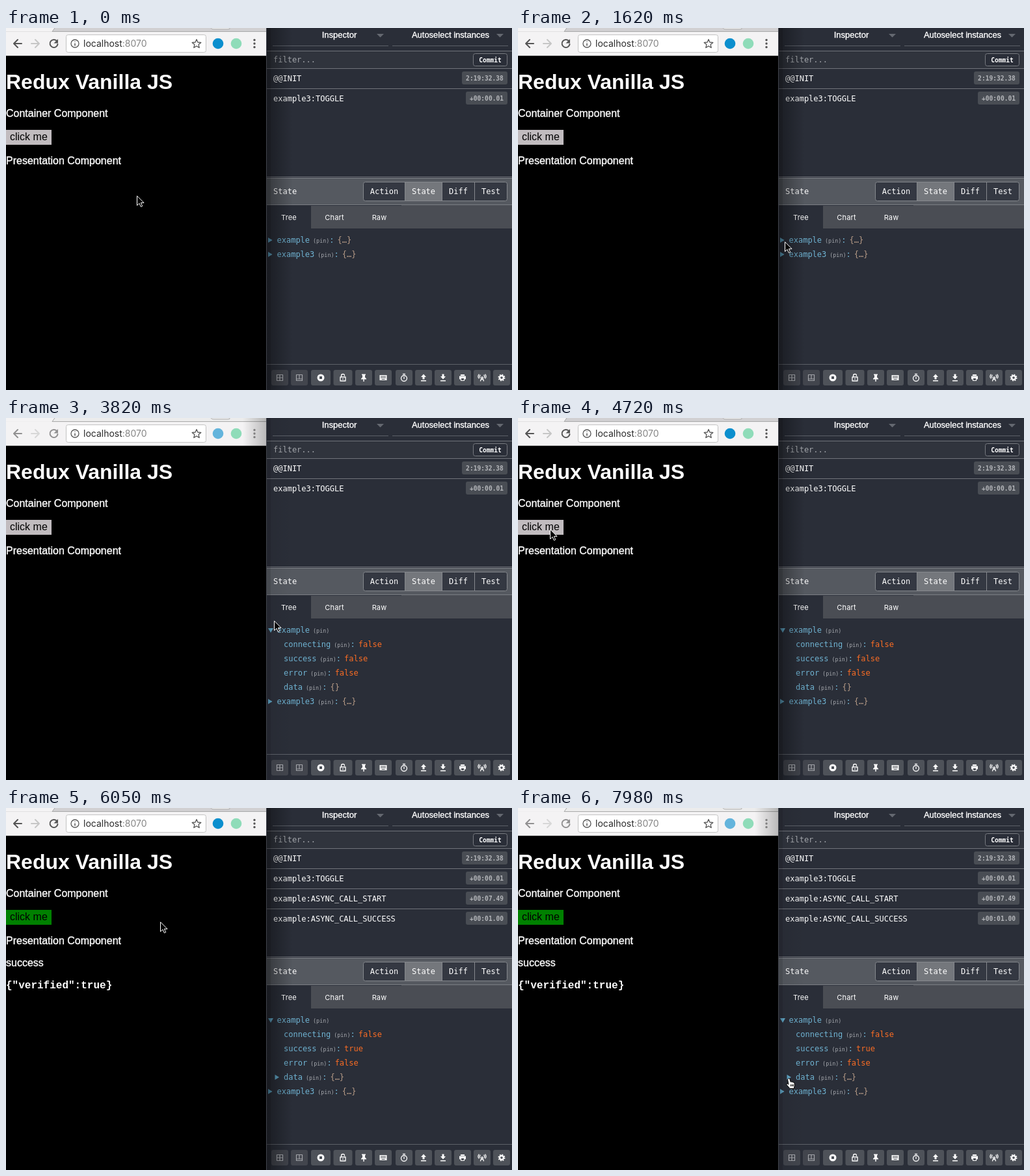
Animation of 778x558 px, one loop 8000 ms. Source, as an HTML page:

```html
<!DOCTYPE html>
<html lang="en">
<head>
<meta charset="utf-8">
<title>Redux Vanilla JS</title>
<style>
  html, body { margin: 0; width: 100%; height: 100%; overflow: hidden; background: #000; }
  svg { display: block; width: 778px; height: 558px; }
  text { white-space: pre; }
  .page { font: 16px "Liberation Sans", Arial, sans-serif; fill: #fff; stroke: #fff; stroke-width: .35px; }
  .title { font-size: 32px; font-weight: bold; stroke: none; }
  .label { fill: #000; stroke: none; }
  .json { font: bold 16px "Liberation Mono", monospace; stroke: none; }
  .url { font: 14px Inter, sans-serif; fill: #2b2b2b; }
  .menu { font: 13px "Liberation Sans", Arial, sans-serif; fill: #fff; stroke: #fff; stroke-width: .35px; text-anchor: middle; }
  .mono { font: 12px "DejaVu Sans Mono", monospace; fill: #fff; }
  .small { font: bold 9.6px "DejaVu Sans Mono", monospace; fill: #b4b6ba; text-anchor: middle; }
  .pin { font: 8.4px "DejaVu Sans Mono", monospace; fill: #a5a8ad; }
  .tab { font: 11px Inter, sans-serif; fill: #fff; text-anchor: middle; letter-spacing: .15px; }
  .mid { text-anchor: middle; }
  .line { fill: none; stroke-linecap: round; stroke-linejoin: round; }
</style>
</head>
<body>
<svg viewBox="0 0 778 558">
  <defs>
    <linearGradient id="shade"><stop offset="0" stop-opacity=".36"/><stop offset="1" stop-opacity="0"/></linearGradient>
    <linearGradient id="edge"><stop offset="0" stop-opacity="0"/><stop offset="1" stop-opacity=".24"/></linearGradient>
  </defs>

  <g id="browser">
    <rect width="400" height="558"/>
    <rect id="strip" width="400" height="6"/>
    <path d="M0 0H75L71 5.5H0Z" fill="#f4f3f4"/>
    <path d="M75 0L71 5.5H400" class="line" stroke="#a9a9a9"/>
    <path d="M315 0q1 2 4 2h22q4 0 3-2" fill="#e9e9e9" stroke="#a0a0a0" stroke-width=".8"/>
    <rect y="6" width="400" height="37" fill="#f4f3f4"/>
    <rect y="42" width="400" height="1" fill="#bdbdbd"/>
    <g id="tools">
      <path d="M24 24H12M18 18l-6 6 6 6" class="line" stroke="#555" stroke-width="2"/>
      <path d="M39 24H51M45 18l6 6-6 6" class="line" stroke="#c6c6c6" stroke-width="2"/>
      <path d="M78.5 20.5a6 6 0 1 0 1 4.500" class="line" stroke="#555" stroke-width="2"/>
      <path d="M80 17v6.500h-6.500z" fill="#555"/>
      <circle cx="326" cy="24" r="8.300" fill="#0b8fce"/>
      <g fill="#555"><circle cx="382" cy="18.500" r="1.700"/><circle cx="382" cy="24" r="1.700"/><circle cx="382" cy="29.500" r="1.700"/></g>
    </g>
    <circle cx="354" cy="24" r="8.300" fill="#8fdcb9"/>
    <rect x="92.500" y="10.500" width="215" height="27" rx="3" fill="#fff" stroke="#c2c2c2"/>
    <circle cx="106" cy="24" r="6" fill="none" stroke="#555" stroke-width="1.300"/>
    <path d="M106 23.500v4M106 20.500v1" stroke="#555" stroke-width="1.500"/>
    <path d="M293 17.500l1.900 4.500 4.900.400-3.700 3.200 1.100 4.800-4.200-2.600-4.200 2.600 1.100-4.800-3.700-3.200 4.900-.400z" class="line" stroke="#555" stroke-width="1.300"/>
    <text x="119" y="29" class="url">localhost<tspan fill="#858585">:8070</tspan></text>
    <rect id="edgeShade" x="364" width="36" height="43" fill="url(#edge)"/>

    <text x="0" y="94" class="page title">Redux Vanilla JS</text>
    <text x="0" y="137" class="page">Container Component</text>
    <rect id="button" y="157" width="70" height="23"/>
    <text x="6" y="173" class="page label">click me</text>
    <text x="0" y="210" class="page">Presentation Component</text>
    <text id="status" x="0" y="244" class="page"></text>
    <text id="result" x="0" y="278" class="page json"></text>
  </g>

  <g id="panel"></g>
  <g id="actions"></g>
  <g id="tree"></g>
  <rect x="401" width="6" height="558" opacity=".1"/>
  <rect id="shadow" x="401" width="40" height="558" fill="url(#shade)"/>

  <g id="pointer">
    <path id="arrow" d="M.5.800V15.500L4 12.300 6.400 17.600 8.700 16.600 6.400 11.400H11Z" fill="#000" stroke="#fff"/>
    <path id="hand" d="M3.500 1.200q1.500-1.200 2.400.500l1.300 4.500q1.200-.900 2 .300 1.200-.800 2 .500 1.500-.400 1.800 1.200l.300 3.800-1.200 4.500H6L1 10.500q-.500-2 1.700-1.500l1.200 1.200L2.700 3Q2.500 1.800 3.500 1.200ZM7.500 10v3M9.500 10v3M11.300 10v3" fill="#fff" stroke="#000"/>
  </g>
</svg>

<script>
const LOOP = 8000;
const CHAR = 7.224;
const $ = id => document.getElementById(id);

const rect = (x, y, w, h, fill, more = '') =>
  `<rect x="${x}" y="${y}" width="${w}" height="${h}" fill="${fill}" ${more}/>`;
const text = (x, y, cls, str, more = '') => `<text x="${x}" y="${y}" class="${cls}" ${more}>${str}</text>`;
const rule = (y, color = '#70737a') => rect(401, y, 377, 1, color);

// Toolbar glyphs, centred on 0,0
const stroke = d => `<path d="${d}" class="line" stroke="#fff" stroke-width="1.3"/>`;
const solid = d => `<path d="${d}" fill="#fff" fill-rule="evenodd"/>`;
const split = d => `<path d="M-4.500-4.500h9v9h-9z${d}" class="line" stroke="#a2a4a9" stroke-width="1.200"/>`;
const icons = [
  [421, 26, split('M0-4.500v9M-4.500 0h9')],
  [451, 26, split('M-4.500 2h9M0-4.500v6')],
  [484, 30, '<circle r="5.500" fill="#fff"/>' + rect(-2, -2, 4, 4, '#4a4e56')],
  [518, 29, stroke('M-4-1h8v6h-8zM-2.500-1v-2q0-2.500 2.500-2.500t2.500 2.500M0 1.500v1')],
  [550, 26, solid('M-3-5.500h6v1l-1 1v3l2 2v1h-3.300v3.500h-1.400v-3.500h-3.300v-1l2-2v-3l-1-1z')],
  [580, 26, solid('M-5.500-4h11v8h-11zM-4-2.500v1h8v-1zM-4-.500v1h8v-1zM-2.500 2v1h5v-1z')],
  [612, 26, stroke('M0-3.500a4.500 4.500 0 1 1-.010 0M0-1v2.500M-1.500-5.500h3')],
  [642, 26, solid('M0-5.500l4 4.500h-2.500v3.500h-3v-3.500h-2.500zM-4 4h8v1.500h-8z')],
  [672, 26, solid('M0 2.500l4-4.500h-2.500v-3.500h-3v3.500h-2.500zM-4 4h8v1.500h-8z')],
  [702, 26, solid('M-3-5h6v2h-6zM-5-2.500h10v5h-2v2.500h-6v-2.500h-2zM-2 1v3h4v-3z')],
  [732, 26, stroke('M0-1.500L-2.500 5M0-1.500L2.500 5M-1.500 2.500h3M-3-4q-1.500 2 0 4M3-4q1.500 2 0 4M-5-5q-2 3 0 6M5-5q2 3 0 6')],
  [762, 26, '<circle r="3" fill="none" stroke="#fff" stroke-width="2.400"/>' +
    '<circle r="4.700" fill="none" stroke="#fff" stroke-width="1.600" stroke-dasharray="1.850 1.840"/>']
];

function drawPanel() {
  let s = rect(400, 0, 378, 558, '#2a2e38') + rect(400, 0, 1, 558, '#41444c');
  for (const [x, center, name] of [[410, 512.5, 'Inspector'], [594, 683.5, 'Autoselect instances']]) {
    s += rect(x, 27, 178, 1, '#5c6068') + text(center, 15, 'menu', name)
      + `<path d="M${x + 160} 9h11l-5.500 5.500z" fill="#646870"/>`;
  }
  s += rect(401, 36, 377, 26, '#30343d') + rule(35) + rule(62)
    + text(411, 53, 'mono', 'filter...', 'style="fill:#a3a6ab"')
    + rect(718.5, 39.5, 52, 19, '#2a2e38', 'rx="3" stroke="#777a80"')
    + text(744.5, 52.5, 'small', 'Commit', 'style="fill:#fff"');

  s += rule(229) + rule(231, '#85888d') + rect(401, 232, 377, 40, '#555960') + rule(272, '#7b7e84')
    + text(411, 256, 'mono', 'State')
    + rect(549.5, 237.5, 221, 29, '#343842', 'rx="3"') + rect(613, 238, 58, 29, '#74777c')
    + rect(549.5, 237.5, 221, 29, 'none', 'rx="3" stroke="#85888d"');
  for (const x of [613, 670, 720]) s += rect(x, 237, 1, 30, '#85888d');
  for (const [x, name] of [[581.5, 'Action'], [642, 'State'], [695.5, 'Diff'], [745.5, 'Test']])
    s += text(x, 256, 'mono mid', name);

  s += rect(469, 273, 309, 36, '#4a4d54') + rect(401, 273, 207, 1, '#2a2e38');
  for (const [x, name] of [[435, 'Tree'], [505, 'Chart'], [574, 'Raw']]) s += text(x, 296, 'tab', name);

  s += rule(518, '#5c6068');
  icons.forEach(([x, w, glyph], i) => {
    s += rect(x - w / 2, 527, w, 24, i < 2 ? '#42454d' : '#4e5259', 'rx="3"')
      + `<g transform="translate(${x} 539)">${glyph}</g>`;
  });
  $('panel').innerHTML = s;
}

const log = [
  ['@@INIT', '2:19:32.38'],
  ['example3:TOGGLE', '+00:00.01'],
  ['example:ASYNC_CALL_START', '+00:07.49'],
  ['example:ASYNC_CALL_SUCCESS', '+00:01.00']
];

function drawActions(count) {
  $('actions').innerHTML = log.slice(0, count).map(([name, time], i) => {
    const y = 62 + 31 * i, w = time.length > 9 ? 70 : 64;
    return rule(y) + text(411, y + 20, 'mono', name)
      + rect(771 - w, y + 5, w, 20, '#494d54', 'rx="3"') + text(771 - w / 2, y + 18.5, 'small', time);
  }).join('');
}

// A node is [depth, key, value, marker]; an open node has no value.
function drawTree(nodes) {
  $('tree').innerHTML = nodes.map(([depth, key, value, marker], i) => {
    const x = 416.5 + 10.5 * depth, y = 327 + 22 * i;
    const pinX = x + key.length * CHAR + 5, colonX = pinX + 25.3;
    const shape = { closed: 'v8l6.500-4z', open: 'h8l-4 7z' }[marker];
    const color = /[{]/.test(value) ? '#b99d88' : '#fc6d24';
    return (shape ? `<path d="M${x - 13.5} ${y - (marker == 'open' ? 3 : 4)}${shape}" fill="#5fa3c2"/>` : '')
      + text(x, y + 4, 'mono', key, 'style="fill:#6fb3d2"') + text(pinX, y + 4, 'pin', '(pin)')
      + (value ? text(colonX, y + 4, 'mono', ':', 'style="fill:#6fb3d2"')
        + text(colonX + CHAR + 5, y + 4, 'mono', value, `style="fill:${color}"`) : '');
  }).join('');
}

const folded = key => [0, key, '{…}', 'closed'];
const unfolded = (connecting, success, data, marker) => [
  [0, 'example', '', 'open'],
  [1, 'connecting', connecting], [1, 'success', success], [1, 'error', 'false'],
  [1, 'data', data, marker], folded('example3')
];

const stages = [
  { at: 0, rows: 2, tree: [folded('example'), folded('example3')], button: '#c1bcbf', status: '', result: '' },
  { at: 2210, rows: 2, tree: unfolded('false', 'false', '{}'), button: '#c1bcbf', status: '', result: '' },
  { at: 5160, rows: 3, tree: unfolded('true', 'false', '{}'), button: '#ffa500', status: 'connecting', result: '' },
  { at: 6050, rows: 4, tree: unfolded('false', 'true', '{…}', 'closed'), button: '#008000', status: 'success', result: '{"verified":true}' }
];
const focusSteps = [{ at: 0, on: true }, { at: 1770, on: false }, { at: 4560, on: true }, { at: 7530, on: false }];

const pointerSteps = [
  [0, 201, 258], [440, 212, 261], [590, 290, 274], [730, 410, 290], [880, 520, 304],
  [1030, 590, 320], [1180, 604, 331], [1320, 520, 334], [1470, 432, 331], [1620, 410, 329], [1770, 403, 328],
  [2060, 400, 329, 'hand'], [2500, 411, 364], [2650, 412, 388], [2790, 415, 410], [2940, 424, 419],
  [3090, 442, 415], [3240, 470, 400], [3380, 498, 378], [3530, 517, 356], [3680, 529, 340], [3820, 412, 312],
  [3970, 270, 262], [4120, 155, 216], [4270, 90, 190], [4410, 62, 177], [4560, 52, 172], [4720, 49, 171],
  [4860, 36, 171], [5300, 75, 172], [5450, 165, 174], [5600, 237, 175],
  [6640, 255, 192], [6790, 342, 285], [6940, 414, 381], [7090, 432, 412], [7240, 430, 418], [7530, 424, 419],
  [7680, 419, 418], [7830, 414, 418, 'hand'], [7980, 412, 416, 'hand']
].map(([at, x, y, shape = 'arrow']) => ({ at, x, y, shape }));

const current = (steps, t) => steps.findLast(step => step.at <= t);
const show = (id, on) => $(id).setAttribute('visibility', on ? 'visible' : 'hidden');

function applyStage({ rows, tree, button, status, result }) {
  drawActions(rows);
  drawTree(tree);
  $('button').setAttribute('fill', button);
  $('status').textContent = status;
  $('result').textContent = result;
}

function applyFocus({ on }) {
  $('strip').setAttribute('fill', on ? '#d1d0d2' : '#ececec');
  $('tools').setAttribute('opacity', on ? 1 : .62);
  show('edgeShade', !on);
  $('shadow').setAttribute('opacity', on ? 1 : .2);
}

function applyPointer({ x, y, shape }) {
  $('pointer').setAttribute('transform', `translate(${x} ${y})`);
  show('arrow', shape == 'arrow');
  show('hand', shape == 'hand');
}

const tracks = [[stages, applyStage], [focusSteps, applyFocus], [pointerSteps, applyPointer]]
  .map(([steps, apply]) => ({ steps, apply, last: null }));

function render(t) {
  for (const track of tracks) {
    const step = current(track.steps, t);
    if (step !== track.last) track.apply(track.last = step);
  }
}

drawPanel();
render(0);
const start = performance.now();
requestAnimationFrame(function tick() {
  render((performance.now() - start) % LOOP);
  requestAnimationFrame(tick);
});
</script>
</body>
</html>
```
